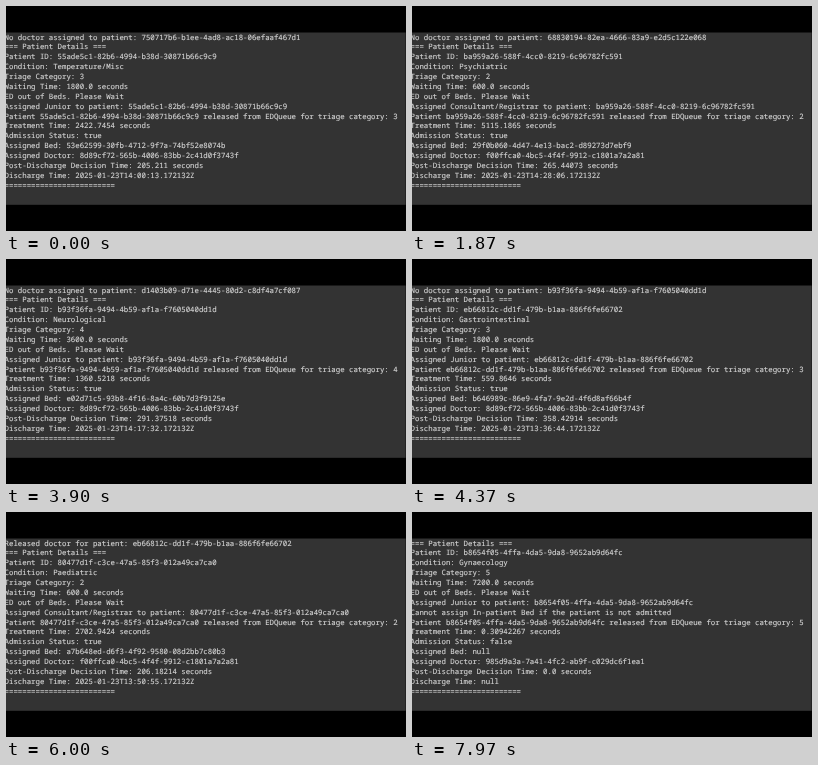
Recreate the animation shown at these times as an HTML page. Size 400 by 225 pixels, loop 8000 ms.

```html
<!DOCTYPE html>
<html lang="en">
<head>
<meta charset="utf-8">
<title>Triage console</title>
<style>
html, body { margin: 0; width: 100%; height: 100%; overflow: hidden; background: #000; }
svg { display: block; width: 100%; height: 100%; }
text {
  font: 7.375px "Noto Sans Mono", "DejaVu Sans Mono", monospace;
  fill: #d8d8d8;
  stroke: #d8d8d8;
  stroke-width: 0.12px;
  white-space: pre;
  text-rendering: geometricPrecision;
}
</style>
</head>
<body>
<svg viewBox="0 0 400 225">
  <rect width="400" height="225" fill="#000"/>
  <rect y="26.5" width="399.7" height="172.3" fill="#333"/>
  <g id="rows"></g>
</svg>
<script>
const LOOP = 8000, ROWS = 16, LEFT = -1.4, TOP = 33.6, STEP = 9.87;
const WAIT = { 2: 600, 3: 1800, 4: 3600, 5: 7200 };
const JUNIOR = '8d89cf72-565b-4006-83bb-2c41d0f3743f';
const SENIOR = 'f00ffca0-4bc5-4f4f-9912-c1801a7a2a81';

// start, id, condition, category, treatment, bed, doctor, decision, discharge
const patients = [
  [0, '55ade5c1-82b6-4994-b38d-30871b66c9c9', 'Temperature/Misc', 3, '2422.7454',
    '53e62599-30fb-4712-9f7a-74bf52e8074b', JUNIOR, '205.211', '14:00:13'],
  [150, '68830194-82ea-4666-83a9-e2d5c122e068', 'Respiratory', 3, '1874.3162',
    '7c1f08b3-5ad2-4e96-a70b-31d96e25f84a', JUNIOR, '318.60245', '13:57:21'],
  [1180, 'ba959a26-588f-4cc0-8219-6c96782fc591', 'Psychiatric', 2, '5115.1865',
    '29f0b060-4d47-4e13-bac2-d89273d7ebf9', SENIOR, '265.44073', '14:28:06'],
  [2200, 'd1403b09-d71e-4445-80d2-c8df4a7cf087', 'Paediatric', 2, '2242.0027',
    '4e6a636f-d670-4869-bde5-43f45e918e16', SENIOR, '242.72227', '13:40:50'],
  [3215, 'b93f36fa-9494-4b59-af1a-f7605040dd1d', 'Neurological', 4, '1360.5218',
    'e02d71c5-93b8-4f16-8a4c-60b7d3f9125e', JUNIOR, '291.37518', '14:17:32'],
  [4170, 'eb66812c-dd1f-479b-b1aa-886f6fe66702', 'Gastrointestinal', 3, '559.8646',
    'b646989c-86e9-4fa7-9e2d-4f6d8af66b4f', JUNIOR, '358.42914', '13:36:44'],
  [5330, '80477d1f-c3ce-47a5-85f3-012a49ca7ca0', 'Paediatric', 2, '2702.9424',
    'a7b648ed-d6f3-4f92-9580-08d2bb7c80b3', SENIOR, '206.18214', '13:50:55'],
  [6320, '3f92c6d8-17ab-4b50-96e4-d85a0b73e12c', 'Cardiac', 2, '3186.4071',
    '914be7a0-c25f-4d83-b16e-7f02a98d43c5', SENIOR, '274.91836', '13:59:02'],
  [7310, 'b8654f05-4ffa-4da5-9da8-9652ab9d64fc', 'Gynaecology', 5, '0.30942267',
    null, '985d9a3a-7a41-4fc2-ab9f-c029dc6f1ea1', '0.0', null]
];

function report([, id, condition, cat, treatment, bed, doctor, decision, end], i) {
  const last = i ? patients[i - 1][1] : '750717b6-b1ee-4ad8-ac18-06efaaf467d1';
  const lines = [
    (i === 6 ? 'Released doctor for patient: ' : 'No doctor assigned to patient: ') + last,
    '=== Patient Details ===',
    `Patient ID: ${id}`,
    `Condition: ${condition}`,
    `Triage Category: ${cat}`,
    `Waiting Time: ${WAIT[cat]}.0 seconds`,
    'ED out of Beds. Please Wait',
    `Assigned ${cat < 3 ? 'Consultant/Registrar' : 'Junior'} to patient: ${id}`
  ];
  if (!bed) lines.push('Cannot assign In-patient Bed if the patient is not admitted');
  lines.push(
    `Patient ${id} released from EDQueue for triage category: ${cat}`,
    `Treatment Time: ${treatment} seconds`,
    `Admission Status: ${!!bed}`,
    `Assigned Bed: ${bed}`,
    `Assigned Doctor: ${doctor}`,
    `Post-Discharge Decision Time: ${decision} seconds`,
    `Discharge Time: ${end ? `2025-01-23T${end}.172132Z` : null}`,
    '='.repeat(25)
  );
  return lines.slice(-ROWS);
}

const screens = patients.map(report);
const group = document.getElementById('rows');
const rows = Array.from({ length: ROWS }, (_, i) => {
  const row = document.createElementNS('http://www.w3.org/2000/svg', 'text');
  row.setAttribute('x', LEFT);
  row.setAttribute('y', TOP + i * STEP);
  return group.appendChild(row);
});

let shown = -1;
function draw(t) {
  const now = patients.filter(p => p[0] <= t).length - 1;
  if (now === shown) return;
  shown = now;
  rows.forEach((row, i) => { row.textContent = screens[now][i]; });
}

const start = performance.now();
function tick() {
  draw((performance.now() - start) % LOOP);
  requestAnimationFrame(tick);
}
tick();
</script>
</body>
</html>
```
